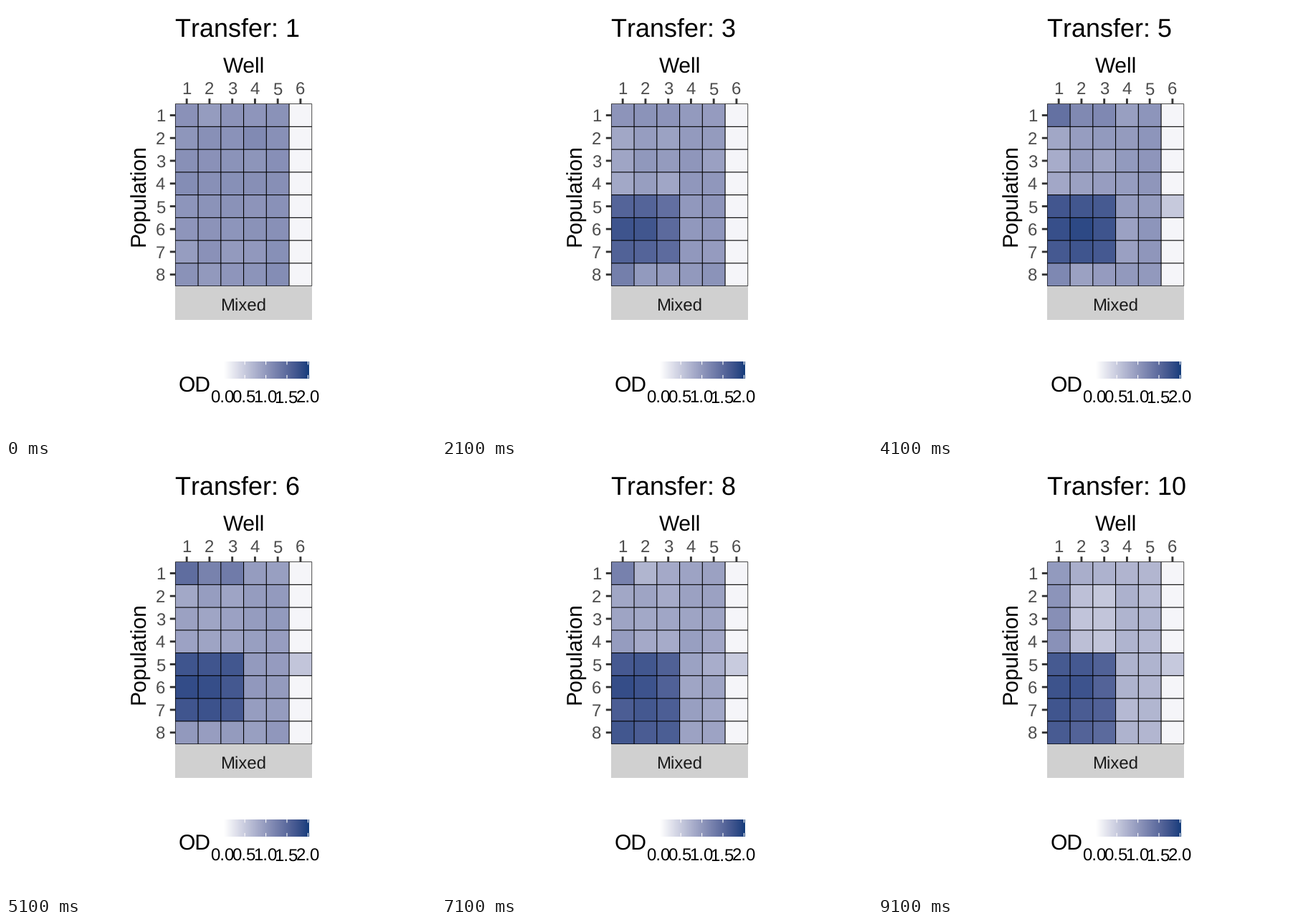
Write a matplotlib script that moves like this. It is 600 by 600 pixels and loops after 10 s.

```python
import numpy as np
import matplotlib.pyplot as plt
from matplotlib.animation import FuncAnimation
from matplotlib.colors import ListedColormap
from matplotlib.patches import Rectangle

plt.rcParams["font.family"] = "Liberation Sans"
plt.rcParams["text.hinting"] = "none"
plt.rcParams["text.kerning_factor"] = 6

DPI = 100
PX = 72 / DPI
X0, Y0, CELL = 236.3, 136.6, 31.75
ROWS, WELLS, TRANSFERS = 8, 6, 10
RIGHT, BOTTOM = X0 + WELLS * CELL, Y0 + ROWS * CELL
MID_X, MID_Y = (X0 + RIGHT) / 2, (Y0 + BOTTOM) / 2
BLANK = 0.09
XYZ = np.array([[0.4124, 0.3576, 0.1805],
                [0.2126, 0.7152, 0.0722],
                [0.0193, 0.1192, 0.9505]])
WHITE = XYZ.sum(axis=1)


def rgb_to_lab(rgb):
    rgb = np.asarray(rgb, float)
    lin = np.where(rgb > 0.04045, ((rgb + 0.055) / 1.055) ** 2.4, rgb / 12.92)
    fx, fy, fz = np.cbrt(XYZ @ lin / WHITE)
    return np.array([116 * fy - 16, 500 * (fx - fy), 200 * (fy - fz)])


def lab_to_rgb(lab):
    fy = (lab[:, 0] + 16) / 116
    f = np.stack([fy + lab[:, 1] / 500, fy, fy - lab[:, 2] / 200], axis=1)
    lin = np.clip(f ** 3 * WHITE @ np.linalg.inv(XYZ).T, 0, 1)
    rgb = np.where(lin > 0.0031308, 1.055 * lin ** (1 / 2.4) - 0.055, 12.92 * lin)
    return np.clip(rgb, 0, 1)


def od_colors(n=512):
    low, high = rgb_to_lab([1, 1, 1]), rgb_to_lab([0.075, 0.238, 0.485])
    t = np.linspace(0, 1, n)[:, None]
    return ListedColormap(lab_to_rgb(low + t * (high - low)))


def curve(**points):
    """Value over transfers from key points such as t4=1.2."""
    t = [int(key[1:]) for key in points]
    return np.interp(np.arange(1, TRANSFERS + 1), t, list(points.values()))


def grow_plates():
    """OD of every well: rows 1-4 flare once, rows 5-7 stay dense, row 8 follows."""
    od = np.full((TRANSFERS, ROWS, WELLS), BLANK)
    first_row = curve(t1=1.03, t3=1.01, t4=1.75, t5=1.18, t7=1.3, t8=.8, t10=.77)
    upper = curve(t1=1.08, t3=.92, t4=1.25, t5=.93, t7=.83, t8=.83, t10=.57)
    lower = curve(t1=1.03, t3=1.57, t4=1.77, t5=1.7, t10=1.63)
    last_row = curve(t1=1.02, t3=1.0, t4=.95, t7=.92, t8=1.63, t10=1.53)
    od[:, 0, :3] = first_row[:, None]
    od[:, 1:4, :3] = upper[:, None, None]
    od[:, 4:7, :3] = lower[:, None, None]
    od[:, 7, :3] = last_row[:, None]

    # Lead of well 1, lag of well 3 and peak of the central dense row
    od[:, 0, 0] += curve(t1=-.03, t4=.05, t5=.24, t7=.17, t8=.45, t10=.25)
    od[:, 1:4, 0] += curve(t1=0, t4=-.1, t5=-.09, t8=.05, t10=.5)[:, None]
    od[:, 4:7, 2] -= curve(t1=.03, t3=.15, t4=0, t8=.06)[:, None]
    od[:, 5, :2] += curve(t1=.02, t3=.13, t10=.08)[:, None]
    od[:, 7, 0] += curve(t1=.05, t3=.24, t5=.22, t7=0, t10=.15)

    # Thinning wells 4 and 5, with a short rise in well 5
    right = curve(t1=1.04, t3=.97, t4=1.02, t5=.96, t7=.94, t8=.9, t10=.73)
    od[:, :, 3] = right[:, None]
    od[:, :, 4] = (right + curve(t1=.03, t3=0, t4=.25, t5=.06, t7=-.04))[:, None]
    od[4:, 4, 5] = 0.52

    noise = np.random.default_rng(3).normal(0, 0.03, od.shape)
    return od + noise * (od > BLANK)


plates = grow_plates()
fig = plt.figure(figsize=(600 / DPI, 600 / DPI), dpi=DPI, facecolor="white")
ax = fig.add_axes([0, 0, 1, 1])
cmap = od_colors()


def label(x, y, text, size, color="black", ha="center", **kw):
    # A fixed fraction keeps round and flat digits on one baseline
    return ax.text(x, round(y) + 0.35, text, fontsize=size * PX, color=color,
                   ha=ha, va="baseline", **kw)


def line(xs, ys, color, width):
    ax.plot(xs, ys, color=color, lw=width * PX, solid_capstyle="butt", snap=False)


# Plate
xs = X0 + CELL * np.arange(WELLS + 1)
ys = Y0 + CELL * np.arange(ROWS + 1)
mesh = ax.pcolormesh(xs, ys, plates[0], cmap=cmap, vmin=0, vmax=2)
ax.add_patch(Rectangle((X0, BOTTOM), RIGHT - X0, 47.3, fc="#d0d0d0", ec="none"))
for x in xs:
    line([x, x], [Y0, BOTTOM], "black", 0.7 if x in (X0, RIGHT) else 1.1)
for y in ys:
    line([X0, RIGHT], [y, y], "black", 0.7 if y in (Y0, BOTTOM) else 1.1)
label(MID_X - 0.5, 424, "Mixed", 24, "#1a1a1a")

# Axes
for i in range(WELLS):
    x = X0 + (i + 0.5) * CELL
    line([x, x], [129.2, Y0], "#333333", 2.9)
    label(x - 0.3, 123, str(i + 1), 24, "#4d4d4d")
for i in range(ROWS):
    y = Y0 + (i + 0.5) * CELL
    line([228.8, X0], [y, y], "#333333", 2.9)
    label(222.2, y + 8.6, str(i + 1), 24, "#4d4d4d", ha="right")
label(MID_X, 93, "Well", 30)
label(193.3, MID_Y, "Population", 30, rotation=90, rotation_mode="anchor")
title = label(X0, 42, "", 36, ha="left")

# Legend
ax.imshow(np.linspace(0, 2, 256)[None, :], cmap=cmap, vmin=0, vmax=2,
          extent=(303.6, 421.8, 519.6, 495.8), aspect="auto",
          interpolation="bilinear")
for i in range(5):
    x = 303.8 + 29.4 * i
    for top in (495.8, 514.9):
        line([x, x], [top, top + 4.7], "white", 1.1)
    label(x - 2.2 + 0.5 * i, 553, f"{i / 2:.1f}", 24)
label(240.6, 538, "OD", 30, ha="left")

ax.set_xlim(0, 600)
ax.set_ylim(600, 0)
ax.set_aspect("auto")
ax.axis("off")

# One blended step leads into each new transfer
SWITCHES = [9, *range(20, 91, 10)]


def update(i):
    n = sum(i >= s for s in SWITCHES)
    blend = i in SWITCHES
    mesh.set_array((plates[n - 1] + plates[n]) / 2 if blend else plates[n])
    title.set_text(f"Transfer: {n + 1}")
    return mesh, title


anim = FuncAnimation(fig, update, frames=100, interval=100, repeat=True,
                     repeat_delay=0)
plt.show()
```
